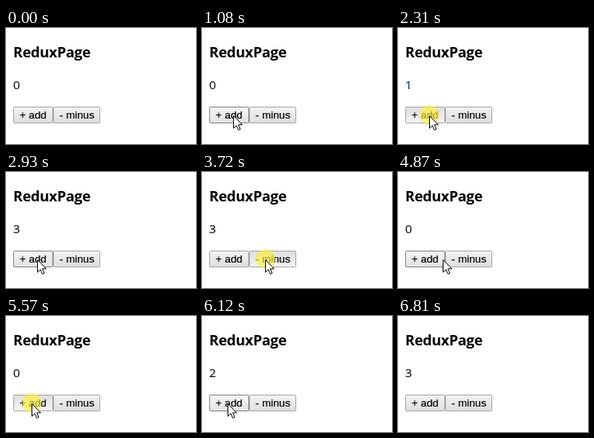
An HTML page for the animation above (7820 ms loop, 238x146 px).

```html
<!DOCTYPE html>
<html lang="en">
<head>
<meta charset="utf-8">
<title>Counter</title>
<style>
  html, body { margin: 0; width: 100%; height: 100%; overflow: hidden; background: #fff; }
  svg { display: block; width: 238px; height: 146px; }
  .page { font-family: "Open Sans", "Noto Sans", sans-serif; }
  .title { font-size: 18px; font-weight: 700; letter-spacing: -.25px; }
  .count { font-size: 14.8px; stroke-width: .2; }
  .button text { font: 13.333px "Liberation Sans", Arial, sans-serif; stroke: #000; stroke-width: .2; }
  .button rect { fill: url(#idle); stroke: #a6a6a6; }
  .button.hover rect { fill: url(#over); stroke: #858585; }
  .button.down rect { fill: url(#down); stroke: #a6a6a6; }
</style>
</head>
<body>
<svg viewBox="0 0 238 146">
  <defs>
    <linearGradient id="idle" x2="0" y2="1"><stop stop-color="#f3f3f3"/><stop offset="1" stop-color="#ddd"/></linearGradient>
    <linearGradient id="over" x2="0" y2="1"><stop stop-color="#f6f6f6"/><stop offset="1" stop-color="#e2e2e2"/></linearGradient>
    <linearGradient id="down" x2="0" y2="1"><stop stop-color="#dedede"/><stop offset="1" stop-color="#f4f4f4"/></linearGradient>
  </defs>
  <g class="page">
    <text class="title" x="9" y="37">ReduxPage</text>
    <text class="count" id="count" x="9" y="77.4">0</text>
  </g>
  <g class="button" id="add">
    <rect x="9.5" y="99.5" width="49" height="20" rx=".8"/>
    <text x="17" y="113.7">+ add</text>
  </g>
  <g class="button" id="minus">
    <rect x="59.5" y="99.5" width="58" height="20" rx=".8"/>
    <text x="67" y="113.7">- minus</text>
  </g>
  <g id="pointer">
    <circle id="glow" r="12" cx=".5" cy="-.5" fill="#fff032" fill-opacity=".66"/>
    <path d="M.5 .5V16.2L4.1 12.8L6.6 18.4L9 17.4L6.6 11.8H11.4Z" fill="#fff" stroke="#000"/>
  </g>
</svg>
<script>
const LOOP = 7820, STEP = 78, HOLD = 80;
const $ = id => document.getElementById(id);
const count = $("count"), add = $("add"), minus = $("minus"), pointer = $("pointer"), glow = $("glow");

const entry = { x: 80, y: 147 };
const legs = [
  { from: 690, to: 1080, x: 39, y: 110 },
  { from: 3170, to: 3470, x: 79, y: 110 },
  { from: 4710, to: 5110, x: 32, y: 110 },
  { from: 6580, to: 6810, x: 232, y: 150 }
];
const presses = {
  add: [1540, 2310, 2850, 5570, 6040, 6500],
  minus: [3720, 4020, 4480]
};

const ease = p => p * p * (3 - 2 * p);

// The pointer is redrawn in steps and has already moved at the start of a leg.
function progress({ from, to }, t) {
  if (t < from) return 0;
  const n = Math.round((to - from) / STEP);
  const k = Math.min(n, Math.floor((t - from) / (to - from) * n + 1e-6));
  return ease((k + 1) / (n + 1));
}

function pointerAt(t) {
  return legs.reduce((at, leg) => {
    const p = progress(leg, t);
    return { x: at.x + (leg.x - at.x) * p, y: at.y + (leg.y - at.y) * p };
  }, entry);
}

function setButton(el, hover, down) {
  el.setAttribute("class", "button" + (hover ? " hover" : "") + (hover && down ? " down" : ""));
}

const released = (list, t) => list.filter(at => t >= at + HOLD).length;

function draw(t) {
  const { x, y } = pointerAt(t);
  const down = [...presses.add, ...presses.minus].some(at => t >= at && t < at + HOLD);
  const total = released(presses.add, t) - released(presses.minus, t);
  const color = total === 1 ? "#0c4468" : "#181818";
  const inRow = y >= 99 && y < 120;

  count.textContent = total;
  count.setAttribute("fill", color);
  count.setAttribute("stroke", color);
  setButton(add, inRow && x >= 9 && x < 59, down);
  setButton(minus, inRow && x >= 59 && x < 118, down);
  pointer.setAttribute("transform", `translate(${Math.round(x)} ${Math.round(y)})`);
  glow.setAttribute("opacity", down ? 1 : 0);
}

const start = performance.now();
function tick() {
  draw((performance.now() - start) % LOOP);
  requestAnimationFrame(tick);
}
tick();
</script>
</body>
</html>
```
